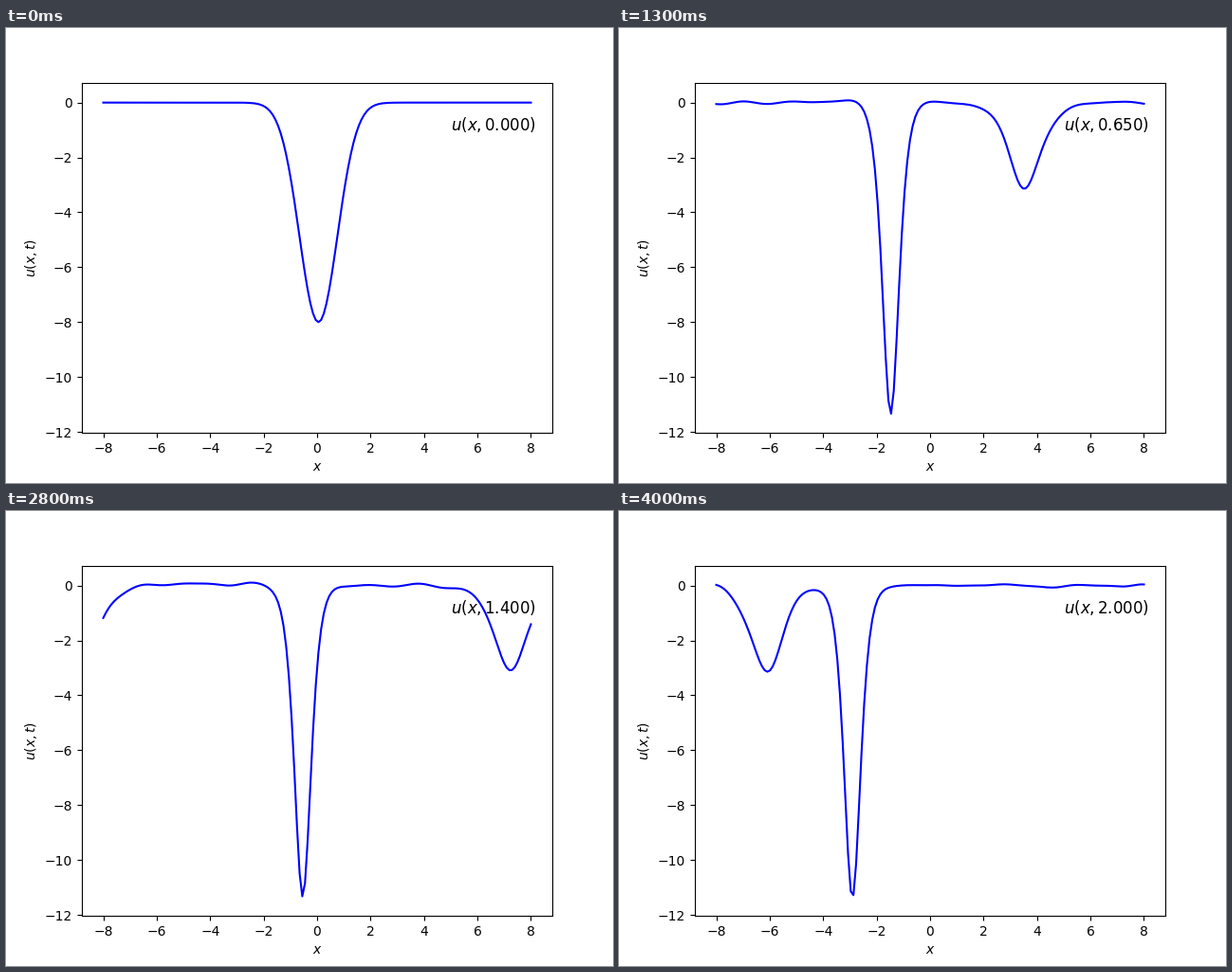
These frames come from a looping animation (640 by 480 pixels, 4.1 s). A matplotlib script:

```python
"""Korteweg-de Vries equation u_t = 6 u u_x - u_xxx on a periodic interval."""
import numpy as np
import matplotlib.pyplot as plt
from matplotlib.animation import ArtistAnimation

N = 160
HALF = 8.0
FRAMES = 41
FRAME_DT = 0.05
SUBSTEPS = 125

h = 2 * HALF / N
dt = FRAME_DT / SUBSTEPS


def rate(u):
    """u_t from central differences with periodic ends."""
    p1, m1 = np.roll(u, -1), np.roll(u, 1)
    p2, m2 = np.roll(u, -2), np.roll(u, 2)
    u_x = (p1 - m1) / (2 * h)
    u_xxx = (p2 - 2 * p1 + 2 * m1 - m2) / (2 * h**3)
    return 6 * u * u_x - u_xxx


def step(u):
    """One classical Runge-Kutta step."""
    a = rate(u)
    b = rate(u + dt / 2 * a)
    c = rate(u + dt / 2 * b)
    d = rate(u + dt * c)
    return u + dt / 6 * (a + 2 * b + 2 * c + d)


def solve():
    u = -8 * np.exp(-(-HALF + h * np.arange(N))**2)
    states = [u]
    for _ in range(FRAMES - 1):
        for _ in range(SUBSTEPS):
            u = step(u)
        states.append(u)
    return states


fig, ax = plt.subplots(figsize=(6.4, 4.8), dpi=100)
ax.set_xlabel("$x$")
ax.set_ylabel("$u(x,t)$")

x = np.linspace(-HALF, HALF, N)
artists = []
for i, u in enumerate(solve()):
    line, = ax.plot(x, u, "b", lw=1.5)
    label = ax.text(5, -1, f"$u(x,{i * FRAME_DT:.3f})$", fontsize=12)
    artists.append([line, label])

anim = ArtistAnimation(fig, artists, interval=100, repeat=True, repeat_delay=0)
plt.show()
```
